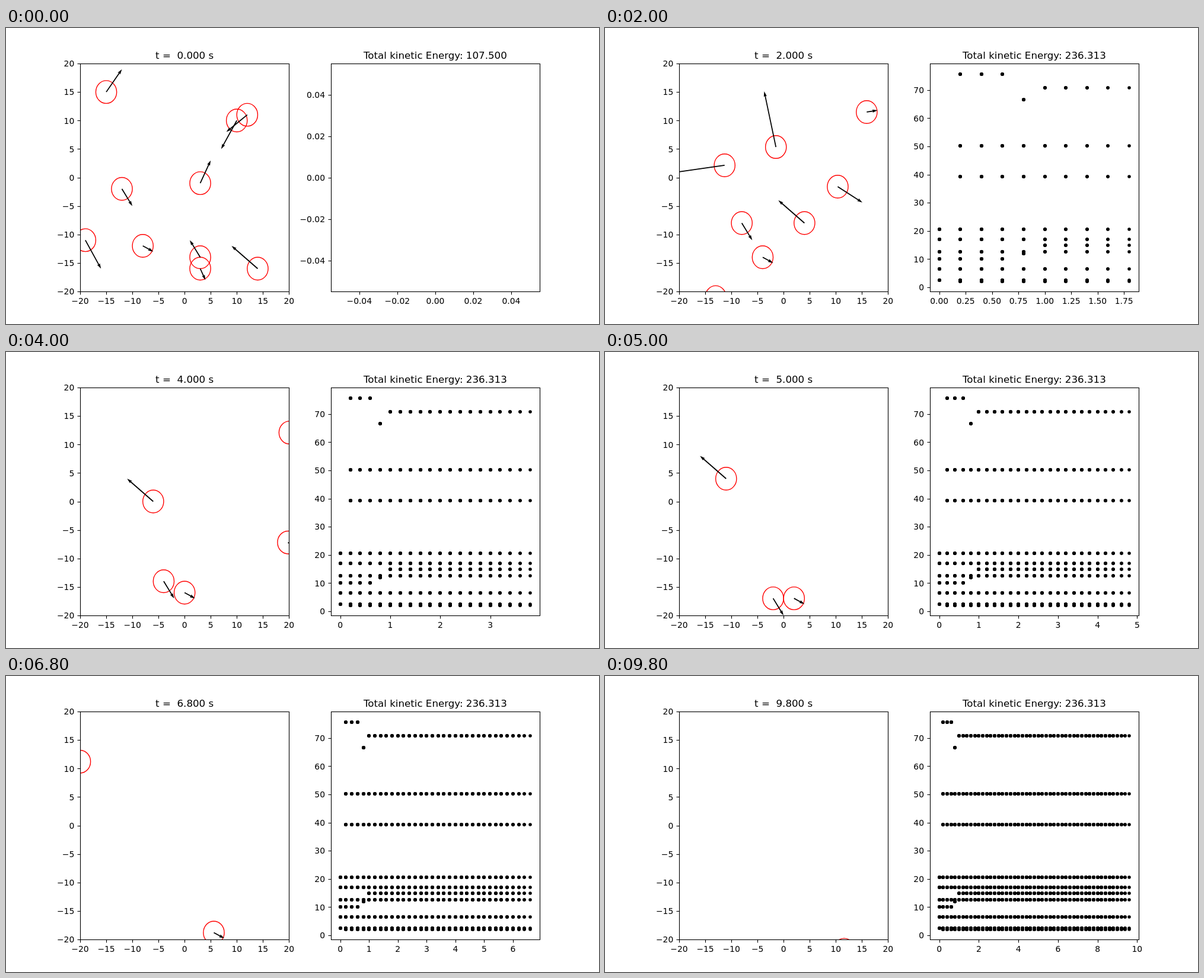
An HTML page with a canvas for the animation above (10000 ms loop, 1000 px wide and 500 px high).

```html
<!DOCTYPE html>
<html lang="en">
<head>
<meta charset="utf-8">
<title>Soft disc collisions</title>
<style>
  html, body { margin: 0; width: 100%; height: 100%; overflow: hidden; background: #fff; }
  canvas { display: block; }
</style>
</head>
<body>
<canvas id="stage" width="1000" height="500"></canvas>
<script>
const ctx = document.getElementById('stage').getContext('2d');
const FRAMES = 50, FRAME_MS = 200, STEP = 0.001, RADIUS = 2, STIFFNESS = 20;
const TOP = 60, BOTTOM = 445, WIDTH = 775 / 2.2, PT = 100 / 72;
const LEFT_AXES = 125, RIGHT_AXES = 900 - WIDTH;

// x, y, vx, vy
const discs = [
  [-15, 15, 3, 4], [10, 10, -3, -5], [12, 11, -4, -3], [3, -1, 2, 4], [-12, -2, 2, -3],
  [-19, -11, 3, -5], [-8, -12, 2, -1], [3, -14, -2, 3], [3, -16, 1, -2], [14, -16, -5, 4]
].map(([x, y, vx, vy]) => ({ x, y, vx, vy }));

// Overlapping discs repel with the cube of their overlap.
function advance() {
  discs.forEach((a, i) => {
    for (const b of discs.slice(i + 1)) {
      const dx = a.x - b.x, dy = a.y - b.y, dist = Math.hypot(dx, dy);
      if (dist >= 2 * RADIUS) continue;
      const kick = STIFFNESS * (2 * RADIUS - dist) ** 3 * STEP / dist;
      a.vx += kick * dx; a.vy += kick * dy;
      b.vx -= kick * dx; b.vy -= kick * dy;
    }
  });
  for (const d of discs) {
    d.x += d.vx * STEP;
    d.y += d.vy * STEP;
  }
}

const kinetic = d => (d.vx ** 2 + d.vy ** 2) / 2;
const history = [];
for (let n = 0; n < FRAMES; n++) {
  history.push({ discs: discs.map(d => ({ ...d })), energies: discs.map(kinetic) });
  for (let s = 0; s < FRAME_MS; s++) advance();
}

function makeAxes(left, [x0, x1], [y0, y1]) {
  return {
    left, xLim: [x0, x1], yLim: [y0, y1],
    px: x => left + (x - x0) / (x1 - x0) * WIDTH,
    py: y => BOTTOM - (y - y0) / (y1 - y0) * (BOTTOM - TOP)
  };
}

function ticks([lo, hi], maxBins) {
  const raw = (hi - lo) / maxBins, scale = 10 ** Math.floor(Math.log10(raw));
  const factor = [1, 2, 2.5, 5, 10].find(f => f * scale >= raw);
  const step = factor * scale;
  const digits = Math.max(0, -Math.floor(Math.log10(step) + 1e-9) + (factor === 2.5 ? 1 : 0));
  const list = [];
  for (let k = Math.ceil(lo / step - 1e-9); k <= hi / step + 1e-9; k++) {
    list.push({ value: k * step, label: (k * step).toFixed(digits).replace('-', '\u2212') });
  }
  return list;
}

function padded(values) {
  const lo = Math.min(...values), hi = Math.max(...values), pad = (hi - lo) * 0.05;
  return hi > lo ? [lo - pad, hi + pad] : [-0.055, 0.055];
}

function line(x0, y0, x1, y1) {
  ctx.beginPath();
  ctx.moveTo(x0, y0);
  ctx.lineTo(x1, y1);
  ctx.stroke();
}

function text(str, x, y, size, align) {
  ctx.font = `${size * PT}px "DejaVu Sans", sans-serif`;
  ctx.textAlign = align;
  ctx.fillText(str, x, y);
}

function drawFrame(axes, title) {
  const { left, px, py } = axes, snap = v => Math.round(v) + 0.5;
  ctx.strokeStyle = ctx.fillStyle = '#000';
  ctx.lineWidth = 0.8 * PT;
  for (const { value, label } of ticks(axes.xLim, 8)) {
    const x = px(value);
    line(snap(x), BOTTOM + 0.5, snap(x), BOTTOM + 5.5);
    text(label, x, BOTTOM + 21, 10, 'center');
  }
  for (const { value, label } of ticks(axes.yLim, 9)) {
    const y = py(value);
    line(snap(left), snap(y), snap(left) - 5, snap(y));
    text(label, left - 7 * PT, Math.round(y + 5.3), 10, 'right');
  }
  ctx.strokeRect(snap(left), TOP + 0.5, snap(left + WIDTH) - snap(left), BOTTOM - TOP);
  text(title, left + WIDTH / 2, 52, 12, 'center');
}

function clipped(axes, paint) {
  ctx.save();
  ctx.beginPath();
  ctx.rect(axes.left, TOP, WIDTH, BOTTOM - TOP);
  ctx.clip();
  paint();
  ctx.restore();
}

function arrow(x0, y0, x1, y1) {
  const w = WIDTH * 0.005, len = Math.hypot(x1 - x0, y1 - y0);
  ctx.save();
  ctx.translate(x0, y0);
  ctx.rotate(Math.atan2(y1 - y0, x1 - x0));
  ctx.beginPath();
  const outline = [[0, 0.5], [len - 4.5 * w, 0.5], [len - 5 * w, 1.5], [len, 0]];
  for (const [x, h] of outline) ctx.lineTo(x, h * w);
  for (const [x, h] of outline.reverse()) ctx.lineTo(x, -h * w);
  ctx.fill();
  ctx.restore();
}

function drawDiscs(n) {
  const axes = makeAxes(LEFT_AXES, [-20, 20], [-20, 20]), { px, py } = axes;
  clipped(axes, () => {
    ctx.strokeStyle = '#f00';
    ctx.fillStyle = '#000';
    ctx.lineWidth = PT;
    for (const { x, y } of history[n].discs) {
      ctx.beginPath();
      ctx.ellipse(px(x), py(y), RADIUS * WIDTH / 40, RADIUS * (BOTTOM - TOP) / 40, 0, 0, 2 * Math.PI);
      ctx.stroke();
    }
    for (const { x, y, vx, vy } of history[n].discs) arrow(px(x), py(y), px(x + vx), py(y + vy));
  });
  drawFrame(axes, `t = ${(n * FRAME_MS / 1000).toFixed(3).padStart(6)} s`);
}

function drawEnergies(n) {
  const past = history.slice(0, n), time = j => j * FRAME_MS / 1000;
  const axes = makeAxes(RIGHT_AXES, padded([0, time(Math.max(0, n - 1))]),
    padded(n ? past.flatMap(s => s.energies) : [0]));
  clipped(axes, () => {
    ctx.fillStyle = '#000';
    past.forEach(({ energies }, j) => {
      // Older dots are overprinted, which hardens their edges.
      const prints = Math.min(n - j, 16);
      for (const e of energies) {
        ctx.beginPath();
        ctx.arc(Math.round(axes.px(time(j))), Math.round(axes.py(e)), 2 * PT, 0, 2 * Math.PI);
        for (let k = 0; k < prints; k++) ctx.fill();
      }
    });
  });
  const total = history[n].energies.reduce((sum, e) => sum + e, 0);
  drawFrame(axes, `Total kinetic Energy: ${total.toFixed(3)}`);
}

let shown = -1;
function render() {
  const n = Math.floor(performance.now() / FRAME_MS) % FRAMES;
  if (n !== shown) {
    shown = n;
    ctx.fillStyle = '#fff';
    ctx.fillRect(0, 0, 1000, 500);
    drawDiscs(n);
    drawEnergies(n);
  }
  requestAnimationFrame(render);
}
render();
</script>
</body>
</html>
```
